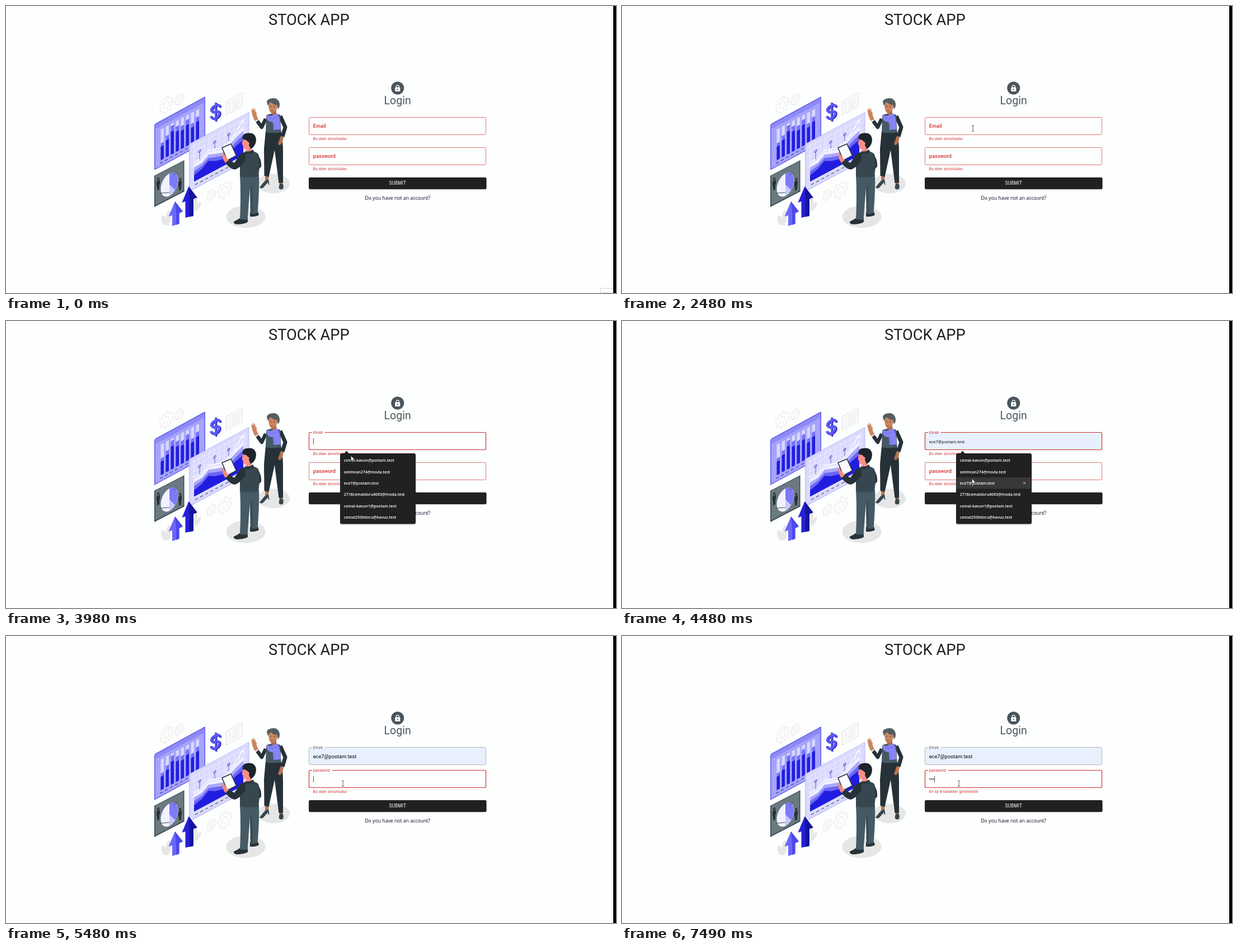
Write an HTML page that moves like this. It is 1090 px wide and 514 px high and loops after 7990 ms.

```html
<!DOCTYPE html>
<html lang="en">
<head>
<meta charset="utf-8">
<title>Stock app login</title>
<style>
html, body { margin: 0; width: 100%; height: 100%; overflow: hidden; background: #fdfefe; }
svg { display: block; width: 1090px; height: 514px; }
text { font-family: Roboto, sans-serif; white-space: pre; }
.body { font-size: 9.08px; letter-spacing: .00938em; }
.label { font-size: 9.08px; letter-spacing: .00938em; font-weight: 500; }
.small { font-size: 6.81px; letter-spacing: .00938em; }
.help { font-size: 6.81px; letter-spacing: .0333em; fill: #d32f2f; }
.sys { font-family: "Open Sans", sans-serif; }
.item { font-size: 7px; font-weight: 600; fill: #fff; }
</style>
</head>
<body>
<svg viewBox="0 0 1090 514" xmlns="http://www.w3.org/2000/svg">
  <rect width="1090" height="514" fill="#fdfefe"/>
  <g id="toast">
    <rect x="1062.5" y="505.5" width="24" height="14" fill="#fff" stroke="#d4d4d4"/>
    <text x="1066" y="516.5" font-size="7" fill="#b5b5b5">Start</text>
  </g>
  <rect x="1085" width="5" height="514"/>
  <text x="541.3" y="34" font-size="27.25" text-anchor="middle" fill="#1e1e1e">STOCK APP</text>

  <g id="art">
    <g id="gears" fill="none" stroke="#e0e0e0" stroke-width=".9"></g>
    <g fill="none" stroke="#e0e0e0" transform="matrix(1 -.55 0 1 393 171)">
      <rect width="29" height="25" fill="#fafafa"/>
      <path d="M5 6h3M11 6h14M5 11h3M11 11h14M5 16h3M11 16h14M5 20h3M11 20h10"/>
    </g>

    <!-- bar chart -->
    <g transform="matrix(1 -.545 0 1 265 212.5)">
      <path d="M0 1L2 -1H90L91 0V79L89 81.5H0Z" fill="#5f5cea"/>
      <rect x="1.5" y="1" width="88" height="79" fill="#a5a3fb"/>
      <rect x="1.5" y="1" width="88" height="8" fill="#8d8af6"/>
      <path d="M8 24H84M8 38H84M8 52H84" stroke="#bbb9fc" stroke-width=".6"/>
      <g id="bars"></g>
      <path d="M10 75H82" stroke="#2f2c93" stroke-width="1.1" stroke-dasharray="5 4"/>
    </g>

    <!-- pie chart -->
    <g transform="matrix(1 -.52 0 1 265 304)">
      <rect width="53.5" height="56" fill="#37474f"/>
      <rect x="1.5" y="1" width="50.5" height="53" fill="#6b7981"/>
      <ellipse cx="27" cy="30" rx="15.5" ry="20" fill="#f1f1ff"/>
      <path d="M27 30V10A15.5 20 0 0 1 37 45Z" fill="#7d7af8"/>
      <path d="M27 30L37 45A15.5 20 0 0 1 27 50Z" fill="#c8c6fd"/>
      <path d="M11 37L27 44M34 17l7-3" stroke="#37474f" stroke-width=".8"/>
      <g fill="#263238">
        <circle cx="7" cy="9" r="2"/><path d="M4 12h6v9h-1v8h-4v-8h-1z"/>
        <circle cx="46" cy="30" r="2"/><path d="M43 33h6v9h-1v8h-4v-8h-1z"/>
      </g>
    </g>

    <!-- area chart -->
    <g transform="matrix(1 -.535 0 1 327 247)">
      <rect width="107.5" height="86" fill="#bcbafb" opacity=".85"/>
      <rect x="1.5" y="1" width="104.5" height="83" fill="#dddcfe" opacity=".9"/>
      <path id="grid" stroke="#f3f2ff" stroke-width=".7"/>
      <g id="areas"></g>
      <path d="M9 39L23 37L35 30L47 34L61 40L73 32L83 25L96 9M92 11L96.5 9L97 15" fill="none" stroke="#fff" stroke-width="1.6"/>
      <path d="M19 24V38M46 22V33M71 22V33" stroke="#3a37b8" stroke-width=".8"/>
      <g fill="#c9c7fe" stroke="#3a37b8" stroke-width=".9">
        <circle cx="19" cy="23" r="2"/><circle cx="46" cy="21" r="2"/><circle cx="71" cy="21" r="2"/>
      </g>
      <path d="M9 73H100" stroke="#fff"/>
      <path d="M11 79H97" stroke="#37474f" stroke-width="1.2" stroke-dasharray="5 4"/>
    </g>

    <!-- currency sign -->
    <g id="cash" fill="none" stroke-linejoin="round">
      <g id="coin" stroke-width="4.2">
        <path d="M383.500 182Q382.500 176 376 179Q368.500 182 368.500 188Q369.500 192 376 190Q383.500 188 382.500 194.500Q381 200 375 202Q369 203.500 367.500 198"/>
        <path d="M376 173.500V207" stroke-width="2.800"/>
      </g>
    </g>

    <!-- growth arrows -->
    <path d="M281 392Q275 382 279 374Q286 376 286 384Q285 367 293 365Q297 378 291 393ZM336 364Q334 347 340 342Q344 348 340 357Q345 350 349 352Q348 362 338 368Z" fill="#e7e7e7"/>
    <path d="M302 350L316 368L309.500 371V390L297 394V375L290.500 377Z" fill="#6a67fb"/>
    <path d="M302 350L316 368L309.500 371V390L304 392V371Z" fill="#4c48ea"/>
    <path d="M326.500 323L341.500 343L335 345.500V376L320.500 379V350L314.500 352Z" fill="#2420d8"/>
    <path d="M326.500 323L341.500 343L335 345.500V376L328 377.500V347Z" fill="#17139d"/>

    <ellipse cx="478" cy="318" rx="29" ry="17.500" fill="#e6e6e6"/>
    <ellipse cx="428.500" cy="377.500" rx="35" ry="20" fill="#e6e6e6"/>

    <!-- woman -->
    <g>
      <path d="M463 303l7 1-2 10-5 4zM488.500 315h6v9l-5 1z" fill="#b97350"/>
      <path d="M453 325Q459 317 463 313L469 310L470.500 320L469 320L468 316L460 325Q456 328 453 325ZM487.500 325L489 318L495 319Q497 326 494 328Q489 330 487.500 325Z" fill="#37474f"/>
      <path d="M464 224L491 222Q495 240 495 262L495 317L487.500 317L480 258L469.500 306L461.500 304L461 256Z" fill="#263238"/>
      <path d="M449 206L457 217L464 202" fill="none" stroke="#263238" stroke-width="6.500" stroke-linejoin="round"/>
      <path d="M490 197L499 217L494 234" fill="none" stroke="#263238" stroke-width="7" stroke-linejoin="round"/>
      <path d="M445 206Q440 199 439 189L438 184L440.500 187L441 181L443 187L444.500 182L446 190Q449 191 447.500 195L451 203Z" fill="#c9855f"/>
      <path d="M491 233l5 2-2 9-4 5-4-1 2-7z" fill="#b97350"/>
      <path d="M465 196Q478 189 490 195L491.500 226Q478 229 464 226Z" fill="#455a64"/>
      <path d="M474 185h9v9q-5 4-9 0z" fill="#a96646"/>
      <path d="M465 194Q471 201 483 192Q490 194 490.500 221L478 222L477 208Q465 208 465 194Z" fill="#8784f8"/>
      <path d="M467 199Q476 205 486 197M480 209V221" fill="none" stroke="#6865e4" stroke-width=".8"/>
      <path d="M469.500 174Q476 169 485 174Q486 183 482 188.500Q476 193.500 472 190Q468.500 184 469.500 174Z" fill="#c9855f"/>
      <path d="M467 176Q464 168 472 166Q486 162 489 175Q489.500 181 486 185L484.500 177Q477 177 474 172.500Q470 172.500 468.500 179Z" fill="#555d62"/>
      <path d="M471 180h3M478 180h3M473.500 187.500q2 1 4 0" fill="none" stroke="#5f3526" stroke-width=".8"/>
    </g>

    <!-- man -->
    <g>
      <path d="M407 386Q414 383 419 379L432 380V387Q425 391 412 391Q406 390 407 386ZM436 369L450 368L452 374Q446 378 436 377Z" fill="#263238"/>
      <path d="M418 302L452 302Q453 330 449.500 371L437 373L436 325L431.500 383L418 382.500Q420 340 418 302Z" fill="#455a64"/>
      <path d="M436 325L437 373L441 372L440 320Z" fill="#394c55"/>
      <path d="M446 264Q457 271 456 288L449 294Z" fill="#263238"/>
      <path d="M418 272Q421 261 434 260Q450 260 452 268L453 289L451 305Q434 309 418 305Z" fill="#37474f"/>
      <path d="M428 262Q420 262 416 269L408 281L397 274L391 280Q400 292 409 293Q417 291 427 278Z" fill="#263238"/>
      <path d="M386 254L402 247L411.500 268L395.500 276.500Z" fill="#fbfbff" stroke="#263238" stroke-width="1.500"/>
      <path d="M386 263Q391 266 394 271L398 276L392 281Q386 274 386 263Z" fill="#f08b80"/>
      <path d="M424 236L436 238L439 258Q435 263 429 260L429 256Q423 257 423.500 250L421.500 247Z" fill="#fa8f86"/>
      <path d="M423 239Q421 229 430 228Q446 225 447 240Q446 252 437 256L434 249Q436 244 432 243Q430 239 423 239Z" fill="#1c252a"/>
      <path d="M428 260Q435 262 441 257L444 262Q435 267 426 264Z" fill="#2b383f"/>
    </g>
  </g>

  <circle cx="699.7" cy="147" r="11.5" fill="#4a555c"/>
  <rect x="695.2" y="145.600" width="9.100" height="7.400" rx="1" fill="#fff"/>
  <path d="M697.200 146v-1.600a2.500 2.500 0 0 1 5 0v1.600" fill="none" stroke="#fff" stroke-width="1.200"/>
  <circle cx="699.7" cy="149.400" r="1.100" fill="#4a555c"/>
  <text x="699.7" y="176.300" font-size="19.400" letter-spacing=".14" text-anchor="middle" fill="#4a555c">Login</text>

  <path id="mailBox"/>
  <text id="mailLabel" x="548.7">Email</text>
  <text id="mailText" x="548.7" y="219"></text>
  <text id="mailHelp" class="help" x="548.7" y="240.300">Bu alan zorunludur</text>
  <g id="lower">
    <path id="passBox"/>
    <text id="passLabel" x="548.7">password</text>
    <g id="dots"></g>
    <text id="passHelp" class="help" x="548.7" y="294.300"></text>
    <rect x="541" y="308" width="317.500" height="21" rx="2.300" opacity=".22"/>
    <rect x="541" y="307" width="317.500" height="21" rx="2.300" fill="#212121"/>
    <text x="699.800" y="319.700" font-size="8.200" letter-spacing=".16" text-anchor="middle" fill="#fff">SUBMIT</text>
    <text class="sys" x="699.7" y="347.300" font-size="8.700" text-anchor="middle" fill="#07071f">Do you have not an account?</text>
  </g>
  <path id="caret" stroke="#222" stroke-width=".8"/>

  <g id="popup">
    <rect x="596.5" y="238" width="136" height="127" rx="3.500" opacity=".16"/>
    <path d="M604 237.500L608.500 232.500L613 237.500Z" fill="#212121"/>
    <rect x="597" y="237" width="135" height="126.500" rx="3" fill="#212121"/>
    <g id="hover">
      <rect x="598" y="280" width="133" height="20.400" fill="#383838"/>
      <path d="M717 288l4.500 4.500m0-4.500l-4.500 4.500" stroke="#ddd" stroke-width=".8"/>
    </g>
    <g id="items"></g>
  </g>

  <path id="arrow" d="M0 0V9.300L2.200 7.300L3.700 10.700L5.200 10L3.700 6.800H6.700Z" fill="#fff" stroke="#222" stroke-width=".7"/>
  <path id="beam" d="M-2.300-5H-.6L0-4.500L.6-5H2.300M0-4.500V4.500M-2.300 5H-.6L0 4.500L.6 5H2.300" fill="none" stroke="#333" stroke-width=".8"/>
</svg>
<script>
const $ = id => document.getElementById(id);
const set = (id, attrs) => { for (const k in attrs) $(id).setAttribute(k, attrs[k]); };
const show = (id, on) => set(id, { display: on ? 'inline' : 'none' });

const RED = '#d32f2f', LOOP = 7990, SHIFT = -13;
const MAIL = 'ece7@postam.test';
const mails = ['cemal-kavun@postam.test', 'selimcan274@moda.test', MAIL,
  '2718cemaldoru4063@moda.test', 'cemal-kavun1@postam.test', 'cemal2936doru@havuz.test'];

function gear(cx, cy, r, teeth) {
  let d = '';
  for (let i = 0; i < teeth * 4; i++) {
    const a = (i + .5) / (teeth * 4) * 2 * Math.PI;
    const q = i % 4 < 2 ? r : r * .76;
    d += (i ? 'L' : 'M') + (q * Math.cos(a)).toFixed(2) + ' ' + (q * Math.sin(a)).toFixed(2);
  }
  return `<g transform="matrix(.85 -.42 0 1 ${cx} ${cy})"><path d="${d}Z"/><circle r="${r * .4}"/></g>`;
}

function drawArt() {
  $('gears').innerHTML = gear(286.5, 177, 14.5, 8) + gear(309.5, 167.5, 10, 8)
    + gear(367, 338.5, 9.8, 8) + gear(391, 329.5, 15, 8);
  $('bars').innerHTML = [30, 38, 51, 45, 41, 47, 35, 42].map((h, i) => {
    const bar = (top, tall, fill) =>
      `<rect x="${11.5 + 9 * i}" y="${top}" width="5.5" height="${tall}" fill="${fill}"/>`;
    return bar(15, 55, '#d8d7fe') + bar(70 - h, h, '#7471f6') + bar(70 - h * .8, h * .8, '#211de0');
  }).join('');

  let d = '';
  for (let x = 9; x < 105; x += 9) d += `M${x} 5V73`;
  for (let y = 9; y < 73; y += 9) d += `M5 ${y}H102`;
  set('grid', { d });

  const xs = [9, 23, 35, 47, 61, 73, 83, 97];
  const area = (ys, fill) =>
    `<path d="M9 73${xs.map((x, i) => `L${x} ${ys[i]}`).join('')}V73Z" fill="${fill}"/>`;
  $('areas').innerHTML = area([42, 40, 33, 37, 43, 35, 28, 20], '#f1f0ff')
    + area([47, 46, 38, 43, 48, 40, 34, 28], '#aaa8fb')
    + area([54, 51, 44, 49, 54, 48, 42, 36], '#6b68f5')
    + area([61, 57, 49, 56, 60, 53, 49, 45], '#211de0');

  const coin = $('coin');
  coin.setAttribute('stroke', '#2722bd');
  const face = coin.cloneNode(true);
  face.removeAttribute('id');
  face.setAttribute('stroke', '#5b57f5');
  face.setAttribute('transform', 'translate(-1.5 -.8)');
  $('cash').append(face);

  $('items').innerHTML = mails.map((m, i) =>
    `<text class="sys item" x="603.8" y="${252.2 + 20.4 * i}">${m}</text>`).join('');
}

// Rounded outline of a field; gap is the width of the label notch.
function frame(y, gap) {
  const x = 541.5, w = 316, h = 31, r = 2, n = gap ? 547 : x + r;
  return `M${n + gap} ${y}H${x + w - r}q${r} 0 ${r} ${r}v${h - 2 * r}q0 ${r} ${-r} ${r}`
    + `H${x + r}q${-r} 0 ${-r} ${-r}v${2 * r - h}q0 ${-r} ${r} ${-r}${gap ? 'H' + n : 'Z'}`;
}

function field(name, y, { gap = 0, color = RED, focus = false, fill = 'none', label = color }) {
  set(name + 'Box', { d: frame(y, gap), stroke: color, fill,
    'stroke-width': focus ? 1.2 : 1, 'stroke-opacity': focus ? 1 : .65 });
  set(name + 'Label', { class: gap ? 'small' : 'label', fill: label, y: y + (gap ? 2.1 : 18.7) });
}

const FILL = '#e8f0fe';
const focused = { gap: 22.5, focus: true };
// Each step changes part of the state and holds until the next one.
const steps = [
  [0, { toast: true, mail: {}, pass: {}, text: '', dots: 0, help: 'Bu alan zorunludur', done: false,
        caret: '', popup: 0, hover: false, kind: '', x: 0, y: 0 }],
  [500, { toast: false, kind: 'arrow', x: 820.4, y: 399.4 }],
  [980, { x: 626.4, y: 242.4 }],
  [1480, { kind: 'beam', x: 620, y: 218.6 }],
  [2480, { x: 627, y: 219.2 }],
  [2980, { x: 620, y: 218.6, mail: focused, caret: 'mail', popup: 1 }],
  [3490, { caret: '' }],
  [3980, { caret: 'mail', kind: 'arrow', x: 616.4, y: 241.4 }],
  [4480, { caret: '', x: 625.4, y: 282.5, hover: true, text: 'preview',
           mail: { ...focused, fill: FILL } }],
  [4980, { caret: 'mail', x: 611.6, y: 278, text: 'full', done: true, popup: .085,
           mail: { ...focused, fill: FILL, color: '#1c1c1c' } }],
  [5480, { caret: 'pass', kind: 'beam', x: 602, y: 264, popup: 0,
           mail: { gap: 22.5, fill: FILL, color: '#8f959d', label: '#666' },
           pass: { gap: 36, focus: true } }],
  [5980, { caret: '' }],
  [6490, { caret: 'pass', dots: 1, help: 'En az 8 karakter girilmelidir' }],
  [6990, { dots: 2 }],
  [7490, { dots: 3 }]
];

function render(t) {
  const s = Object.assign({}, ...steps.filter(e => e[0] <= t).map(e => e[1]));
  show('toast', s.toast);
  field('mail', 199.5, s.mail);
  field('pass', 253.5, s.pass);
  $('mailText').textContent = s.text ? MAIL : '';
  set('mailText', s.text === 'preview'
    ? { class: 'sys', 'font-size': 7.4, 'font-weight': 500 }
    : { class: 'body', 'font-weight': 400 });
  show('mailHelp', !s.done);
  $('passHelp').textContent = s.help;
  set('lower', { transform: `translate(0 ${s.done ? SHIFT : 0})` });

  let dots = '';
  for (let i = 0; i < s.dots; i++) dots += `<circle cx="${550.5 + 3.05 * i}" cy="269.3" r="1.05"/>`;
  $('dots').innerHTML = dots;

  show('caret', s.caret);
  const end = s.caret === 'pass' ? 3.05 * s.dots
    : s.text ? $('mailText').getComputedTextLength() : 0;
  set('caret', { d: `M${549.4 + end} ${s.caret === 'pass' ? 251 : 210}v11` });

  show('popup', s.popup);
  show('hover', s.hover);
  const k = s.popup < 1 ? .956 : 1;
  set('popup', { opacity: s.popup,
    transform: `translate(664.5 300.4) scale(${k}) translate(-664.5 -300.4)` });

  for (const c of ['arrow', 'beam']) {
    show(c, s.kind === c);
    set(c, { transform: `translate(${s.x} ${s.y})` });
  }
}

drawArt();
const start = performance.now();
function tick() {
  render((performance.now() - start) % LOOP);
  requestAnimationFrame(tick);
}
tick();
</script>
</body>
</html>
```
